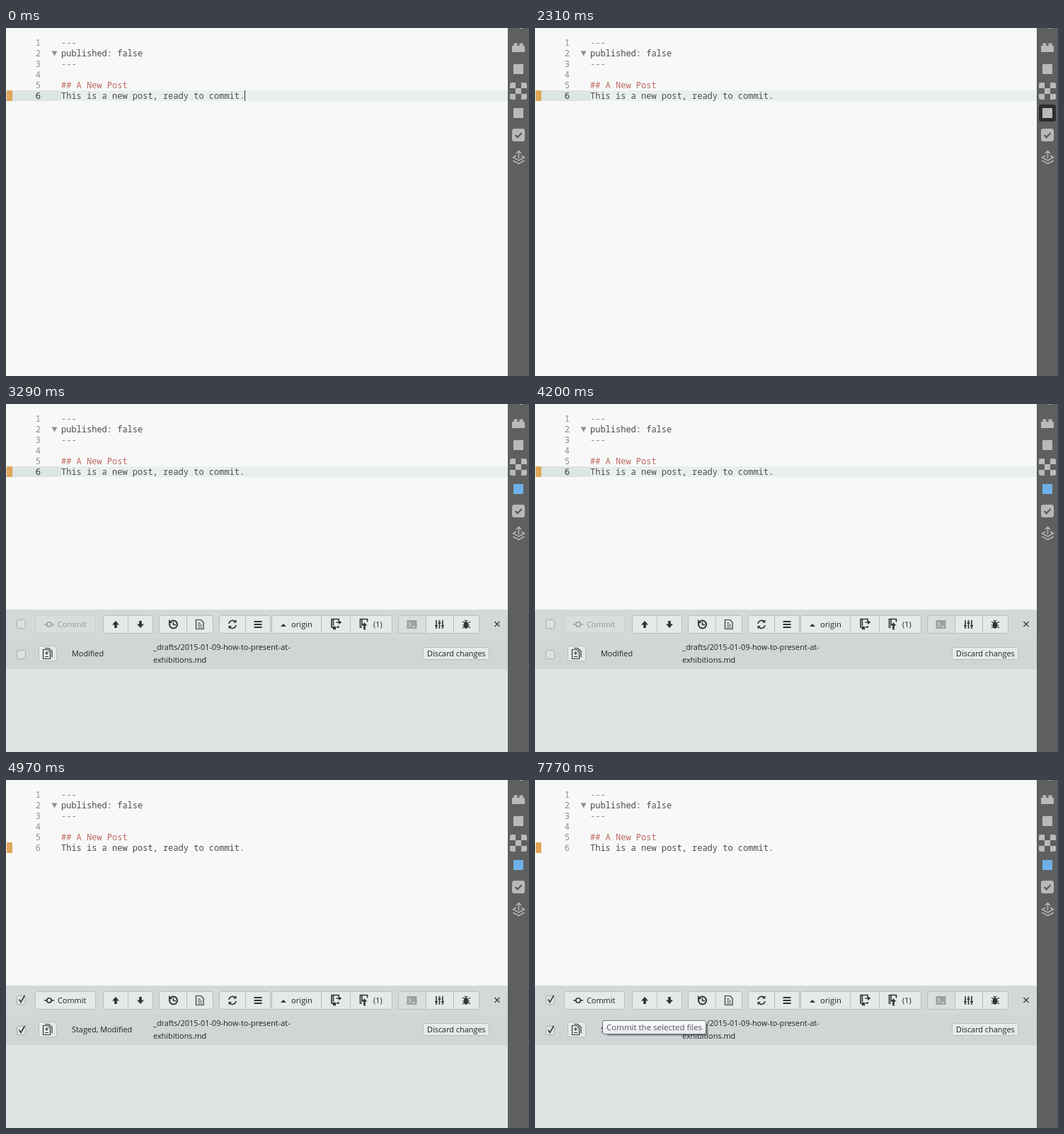
These frames come from a looping animation (739 px wide and 491 px high, 8 s). An HTML page:

```html
<!DOCTYPE html>
<html lang="en">
<head>
<meta charset="utf-8">
<title>Commit panel</title>
<style>
html, body { margin: 0; width: 100%; height: 100%; overflow: hidden; background: #f8f8f8; }
svg { display: block; width: 739px; height: 491px; }
.code { font: 12px "Noto Sans Mono", monospace; fill: #4b4b4b; white-space: pre; }
.nums { fill: #8e8e8e; text-anchor: end; }
.ui { font: 10.9px "Open Sans", sans-serif; fill: #222; }
.btn { fill: #e5e9e9; stroke: #b7bebe; }
.box { fill: #dde2e2; stroke: #a9b0b0; }
.line { fill: none; stroke: #333; stroke-width: 1.6; }
.thin { stroke-width: 1.2; }
.solid { fill: #333; }
.tick { fill: none; stroke: #333; stroke-width: 1.5; }

.anim { animation: 8s step-end infinite; }
.caret { animation-name: caret; }
.hover { animation-name: hover; }
.git { animation-name: git; }
.panel { animation-name: panel; }
.active { animation-name: active; }
.checked { animation-name: checked; }
.idle { animation-name: idle; }
.staged { animation-name: staged; }
.shade { animation-name: shade; }
.tip { animation-name: tip; }

@keyframes caret {
  0%, 8.75%, 21%, 33.25%, 46.375% { opacity: 1; }
  2.625%, 14.875%, 27.125%, 41.125%, 52.5%, 100% { opacity: 0; }
}
@keyframes hover {
  0%, 37.625%, 100% { opacity: 0; }
  8.75%, 32.375% { opacity: .25; }
  28.875% { opacity: .52; }
}
@keyframes git { 0% { fill: #b9b9b9; } 32.375%, 100% { fill: #6fb0ea; } }
@keyframes panel { 0% { opacity: 0; } 32.375%, 100% { opacity: 1; } }
@keyframes active { 0% { opacity: 1; } 58.625%, 100% { opacity: 0; } }
@keyframes checked { 0% { opacity: 0; } 59.5%, 100% { opacity: 1; } }
@keyframes idle { 0% { opacity: 1; } 62.125%, 100% { opacity: 0; } }
@keyframes staged { 0% { opacity: 0; } 62.125%, 100% { opacity: 1; } }
@keyframes shade { 0% { opacity: 0; } 94.5%, 100% { opacity: 1; } }
@keyframes tip {
  0%, 94.5% { opacity: 0; }
  95.375% { opacity: .33; }
  96.25% { opacity: .67; }
  97.125%, 100% { opacity: 1; }
}
</style>
</head>
<body>
<svg viewBox="0 0 739 491">
  <defs>
    <linearGradient id="edge" x2="0" y2="1">
      <stop stop-color="#f8f8f8"/><stop offset="1" stop-color="#c8cece"/>
    </linearGradient>
    <linearGradient id="tipFill" x2="0" y2="1">
      <stop stop-color="#fff"/><stop offset="1" stop-color="#e4e5f0"/>
    </linearGradient>
    <filter id="blur"><feGaussianBlur stdDeviation="1"/></filter>
    <clipPath id="outside"><path d="M242 339h8v27h-152v-7h144z"/></clipPath>
    <g id="commit">
      <rect class="btn" x="41.5" y="298.5" width="85" height="25" rx="3"/>
      <circle class="line" cx="61" cy="311" r="3.2"/>
      <path class="line" d="M54 311h4m6 0h4"/>
      <text class="ui" x="73" y="315">Commit</text>
    </g>
    <path id="tick" class="tick" d="M.5 4.500l2.500 4 5.500-9.500"/>
    <path id="arrow" class="solid" d="M0-5l5 5.500h-3.200v4.500h-3.600v-4.500h-3.200z"/>
  </defs>

  <rect width="739" height="491" fill="#f8f8f8"/>
  <g class="anim active">
    <rect y="88" width="709" height="15" fill="#e9efee"/>
    <rect y="88" width="78" height="15" fill="#dce5e5"/>
  </g>
  <rect x="1" y="88" width="8" height="15" fill="#e0a050" opacity=".94"/>
  <path d="M64.500 32.500h8l-4 7z" fill="#8d9090"/>

  <g class="code nums">
    <text x="49" y="25">1</text><text x="49" y="40">2</text><text x="49" y="55">3</text>
    <text x="49" y="70">4</text><text x="49" y="85">5</text><text x="49" y="100">6</text>
    <text class="anim active" x="49" y="100" fill="#444">6</text>
  </g>
  <g class="code">
    <text x="78" y="25" fill="#888">---</text>
    <text x="78" y="40">published: false</text>
    <text x="78" y="55" fill="#888">---</text>
    <text x="78" y="85" fill="#bd6a60">## A New Post</text>
    <text x="78" y="100">This is a new post, ready to commit.</text>
  </g>
  <rect class="anim caret" x="337" y="88" width="1" height="15" fill="#333"/>

  <g class="anim panel">
    <rect y="289" width="709" height="3" fill="url(#edge)"/>
    <rect y="292" width="709" height="39" fill="#d3d8d8"/>
    <rect y="331" width="709" height="43" fill="#cfd6d5"/>
    <rect y="374" width="709" height="117" fill="#dee3e3"/>

    <rect class="box" x="15.5" y="304.5" width="12" height="12" rx="2"/>
    <rect class="box" x="15.5" y="347.5" width="12" height="12" rx="2"/>
    <use class="anim staged" href="#tick" x="18" y="305"/>
    <use class="anim checked" href="#tick" x="18" y="348"/>
    <g class="anim idle"><use href="#commit" opacity=".35"/></g>
    <use class="anim staged" href="#commit"/>

    <g class="btn">
      <rect x="137.5" y="298.5" width="70" height="25" rx="3"/>
      <rect x="216.5" y="298.5" width="76" height="25" rx="3"/>
      <rect x="301.5" y="298.5" width="72" height="25" rx="3"/>
      <rect x="375.5" y="298.5" width="170" height="25" rx="3"/>
      <rect x="554.5" y="298.5" width="114" height="25" rx="3"/>
      <path d="M593.500 298.500h-36q-3 0-3 3v19q0 3 3 3h36z" fill="#d9dede"/>
      <path d="M172.500 299v24m83-24v24m83-24v24m107-24v24m41-24v24m146-24v24"/>
      <rect x="46.5" y="341.5" width="25" height="21" rx="3"/>
      <rect x="589.5" y="343.5" width="93" height="17" rx="2"/>
    </g>

    <use href="#arrow" x="155" y="311"/>
    <use href="#arrow" transform="translate(190 311) rotate(180)"/>
    <g class="line">
      <circle cx="236.5" cy="311" r="5.5" stroke-width="2"/>
      <path d="M236.500 307.500v4h3.500"/>
      <path class="thin" d="M268.500 304.500h7l3.500 3.500v9.500h-10.500zM271 309h4m-4 3h6m-6 3h6"/>
      <path d="M315 310a5 5 0 0 1 9-2.500m1 4.500a5 5 0 0 1-9 2.500"/>
      <path d="M350.500 307h11m-11 4h11m-11 4h11" stroke-width="2"/>
      <path d="M470 306v-2.500h-10v11.500h2.500m4 0h3.500v-2M462.500 304v9m4-5h6M465 315v3"/>
      <path d="M503 315h-2.500v-11.500h10v4M503 304v9"/>
      <path d="M608 305v12m4.500-12v12m4.500-12v12M606 313h4m.5-4h4m.5 4h4"/>
      <path class="thin" d="M645 307l3 2m-3.500 3h11m-10.500 4l3-2m8-7l-3 2m3 7l-3-2M648 305l2 2 2-2"/>
      <path class="thin" d="M690.500 307l7 7m0-7l-7 7"/>
      <path class="thin" d="M52.500 346.500h6.500l3.500 3.500v9.500h-10zM55 344.500h5.500l4.500 4.500v8.500M57.500 349v5m-2.500-2.500h5m-5 5h5"/>
    </g>
    <g class="solid">
      <path d="M230 304v5h5zM325.500 304v4.500h-4.500zM314.500 317.500v-4.500h4.500zM388 314l4-4 4 4z"/>
      <path d="M470 305l4.500 3-4.500 3zM462 314h4v5l-2-1.500-2 1.500z"/>
      <path d="M506.500 308.500l4 4h-2.700v6h-2.600v-6h-2.700z"/>
      <ellipse cx="650" cy="312" rx="3.2" ry="4.8"/>
    </g>
    <rect x="566.5" y="305" width="14" height="12" fill="#9ba0a0"/>
    <path d="M569 308l3 3-3 3m5 0h4" fill="none" stroke="#d9dede" stroke-width="1.3"/>

    <g class="ui">
      <text x="403" y="315" font-size="11.2">origin</text>
      <text x="519" y="315">(1)</text>
      <text class="anim idle" x="93" y="356">Modified</text>
      <text class="anim staged" x="93" y="356">Staged, Modified</text>
      <text x="208" y="347">_drafts/2015-01-09-how-to-present-at-</text>
      <text x="208" y="365">exhibitions.md</text>
      <text x="595" y="356">Discard changes</text>
    </g>
  </g>

  <g class="anim shade">
    <rect x="102" y="345" width="141.5" height="15" fill="#333" opacity=".8" filter="url(#blur)" clip-path="url(#outside)"/>
  </g>
  <g class="anim tip">
    <rect x="95.5" y="339.5" width="146" height="19" rx="2.5" fill="url(#tipFill)" stroke="#767676"/>
    <text class="ui" x="101" y="353" style="font-size:11.5px;fill:#575757">Commit the selected files</text>
  </g>

  <rect x="709" width="30" height="491" fill="#5d5f60"/>
  <g fill="#b9b9b9">
    <path d="M726 0h3v1h-3z"/>
    <path d="M715 25h2.500v-3.500h5v3.500h3v-3.500h5v3.500h2.500v9h-18z"/>
    <rect x="717" y="51" width="14" height="14"/>
    <path d="M715 77h5v8h-8v-5q0-3 3-3zM728 77h5q3 0 3 3v5h-8zM720 85h8v8h-8zM712 93h8v8h-5q-3 0-3-3zM728 93h8v5q0 3-3 3h-5z"/>
    <rect x="715" y="142" width="18" height="18" rx="3.5"/>
  </g>
  <rect class="anim hover" x="712" y="108" width="24" height="24" rx="3"/>
  <rect class="anim git" x="717" y="113" width="14" height="14"/>
  <path d="M719.500 151l3.200 3.200 6-6.200" fill="none" stroke="#5d5f60" stroke-width="2.4"/>
  <path d="M721 180l-4.500 2.500 8 4.500 8-4.500-4.500-2.500M716.500 187l8 4.500 8-4.500M724.500 184v-10.500M721 177l3.500-3.500 3.500 3.500"
        fill="none" stroke="#b9b9b9" stroke-width="1.5"/>
</svg>
</body>
</html>
```
